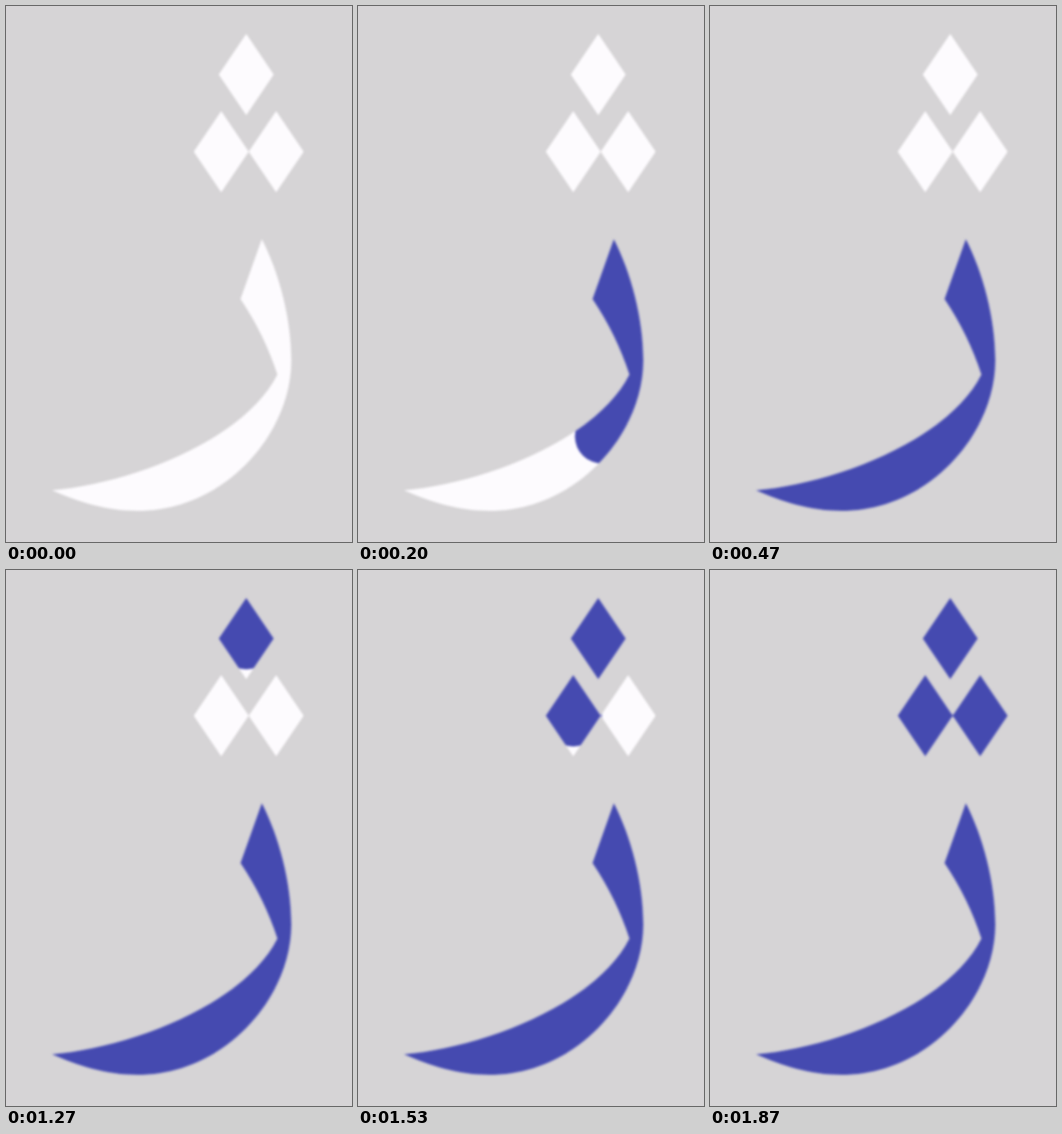
Recreate the animation shown at these times as an HTML page. Size 422 by 653 pixels, loop 4 s.

```html
<!DOCTYPE html>
<html>
<head>
<meta charset="utf-8">
<title>Letter writing order</title>
<style>
  html, body { margin: 0; width: 100%; height: 100%; overflow: hidden; background: #d6d4d6; }
  svg { display: block; width: 422px; height: 653px; }
  #art { filter: blur(1.4px); }
  #ink path { fill: none; stroke: #454ab0; stroke-linecap: round; }
</style>
</head>
<body>
<svg viewBox="0 0 422 653">
  <clipPath id="inside"><path id="shape"/></clipPath>
  <g id="art">
    <path id="blank" fill="#fdfbfe"/>
    <g id="ink" clip-path="url(#inside)">
      <path id="pen" stroke-width="66"
        d="M313 314V358Q335 400 337 440Q337 485 294 528Q255 563 188 585Q135 600 84 592"/>
    </g>
  </g>
</svg>
<script>
const LOOP = 4000, STEP = 200 / 3;
const PEN_STEPS = 7, FIRST_DOT = 19, DOT_GAP = 4;
const $ = id => document.getElementById(id);

const dots = [[293, 83.5], [262.5, 177.5], [329.5, 177.5]];
const diamond = ([x, y]) => `M${x} ${y - 49.5}l33.5 49.5-33.5 49.5-33.5-49.5z`;
const body = 'M312 284C333 325 348 380 348 432C348 520 268 615 160 615' +
  'C122 615 88 604 56 590C150 582 290 530 331 449Q315 400 286 357Z';
const outline = body + dots.map(diamond).join('');
$('shape').setAttribute('d', outline);
$('blank').setAttribute('d', outline);

const dabs = dots.map(() => {
  const dab = document.createElementNS('http://www.w3.org/2000/svg', 'path');
  dab.setAttribute('stroke-width', 70);
  $('ink').append(dab);
  return dab;
});

const show = (el, on) => { el.style.display = on ? '' : 'none'; };

function draw(time) {
  // Time advances in 15 fps steps; the offset absorbs 10 ms rounding.
  const step = Math.floor((time % LOOP + 4) / STEP);

  // The pen slows slightly towards the tail.
  const k = Math.min(step, PEN_STEPS);
  show($('pen'), k > 0);
  $('pen').setAttribute('stroke-dasharray', `${83 * k - 2.6 * k * k} 900`);

  dabs.forEach((dab, i) => {
    const [x, y] = dots[i];
    const age = step - FIRST_DOT - DOT_GAP * i;
    show(dab, age >= 0);
    dab.setAttribute('d', `M${x} ${y - 20}V${y + (age > 0 ? 20 : 2.5)}`);
  });
}

const start = performance.now();
function tick() {
  draw(performance.now() - start);
  requestAnimationFrame(tick);
}
tick();
</script>
</body>
</html>
```
